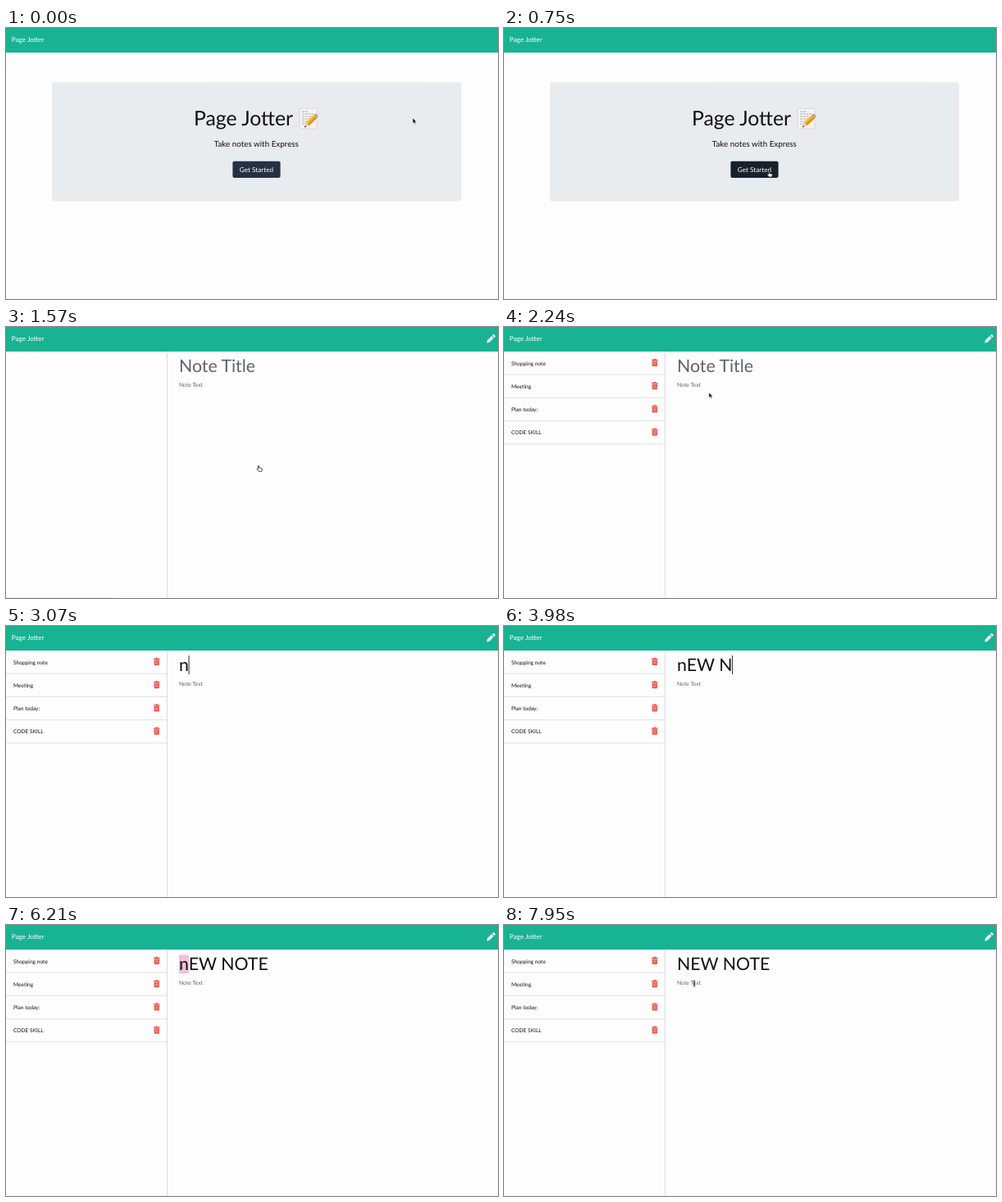
An HTML page for the animation above (8000 ms loop, 600 by 331 pixels).

```html
<!DOCTYPE html>
<html lang="en">
<head>
<meta charset="utf-8">
<title>Page Jotter</title>
<style>
  html, body { margin: 0; width: 100%; height: 100%; overflow: hidden; background: #fefdfe; }
  svg { display: block; width: 100%; height: 100%; }
  text { font-family: Lato, "Open Sans", sans-serif; fill: #111; white-space: pre; text-rendering: geometricPrecision; }
  .small { font-size: 6.6px; }
  .brand { font-size: 8.2px; fill: #fff; }
  .mid { text-anchor: middle; }
  .heading { font-size: 21.3px; }
  .hint { fill: #606365; }
</style>
</head>
<body>
<svg viewBox="0 0 600 331" preserveAspectRatio="none">
  <defs>
    <g id="bin" fill="#e35345">
      <path d="M0 1.2h2.2l.6-1h2l.6 1h2.2v1.1H0z"/>
      <path d="M.6 2.8h6.4v5.5q0 1-1 1H1.6q-1 0-1-1z"/>
      <path d="M2.3 3.9v4.2M3.8 3.9v4.2M5.3 3.9v4.2" stroke="#f6bcb5" stroke-width=".6"/>
    </g>
  </defs>
  <rect width="600" height="331" fill="#fefdfe"/>

  <g id="home">
    <rect x="56" y="66.3" width="499" height="145.2" rx="2" fill="#e8ecee"/>
    <text x="229" y="119.2" font-size="24.8">Page Jotter</text>
    <g id="memo">
      <rect x="358.2" y="98.3" width="20.8" height="24.6" rx="1" fill="#f4f4f3" stroke="#cfd1d2" stroke-width=".7"/>
      <path d="M361 102h8M361 105h14M361 108h12M361 111h10M361 114h7M361 117h4" stroke="#a3a6aa" stroke-width=".9" stroke-dasharray="3 .7"/>
      <path d="M364 121.5l1.8-6.3 4 3.8z" fill="#e9c79b"/>
      <path d="M364 121.5l.7-2.3 1.5 1.5z" fill="#333"/>
      <path d="M365.8 115.2l9-8.6 4 4-9 8.4z" fill="#f5bd2c"/>
      <path d="M367.8 117.1l9-8.5 2 2-9 8.4z" fill="#dc9420"/>
      <path d="M374.8 106.6l1.2-1.2 4 4-1.2 1.2z" fill="#a9adb0"/>
      <path d="M376 105.4q1.6-1.5 3.3.2 1.9 2 .7 3.8z" fill="#e58a86"/>
    </g>
    <text class="mid" x="305.3" y="145.4" font-size="9.85">Take notes with Express</text>
    <rect id="ring" x="275.3" y="161.6" width="60.4" height="22.4" rx="2.6" fill="#99a3ac"/>
    <rect id="button" x="276.4" y="162.7" width="58.2" height="20.2" rx="1.8"/>
    <text class="brand mid" x="305.5" y="175.8">Get Started</text>
  </g>

  <g id="notes">
    <path d="M196.5 30V331" stroke="#dcdcdf"/>
    <g id="list"></g>
    <rect id="selection" x="211" y="36.5" width="12" height="22.5" fill="#f5c0da"/>
    <text id="heading" class="heading" x="211" y="55.2"></text>
    <text class="hint" x="211" y="72.9" font-size="6.8">Note Text</text>
    <rect id="caret" width=".9" fill="#111"/>
  </g>

  <rect width="600" height="30" fill="#18b393"/>
  <text class="brand" x="6.7" y="17.4">Page Jotter</text>
  <path id="pencil" d="M586.3 19.4l.6-3.2 5.2-5.2 2.6 2.6-5.2 5.2zM592.8 10.3l1-1q.8-.7 1.6 0l1.1 1.1q.7.8 0 1.5l-1 1z" fill="#f3fbf9"/>
  <rect id="status" y="330" width="130" height="1" fill="#ebebed"/>

  <g id="pointer" stroke-linejoin="round">
    <path id="arrow" d="M0 0v6.6l1.6-1.4 1.1 2.5 1.1-.5-1.1-2.4h2.1z" fill="#111" stroke="#fff" stroke-width=".5"/>
    <path id="hand" d="M-1.6-3.2q.7-.8 1.3 0v2.2l3 .6q.7.2.6.9l-.5 2.8h-3.6l-2-2.5q-.2-.9.6-.8l.6.4z" fill="#fff" stroke="#222" stroke-width=".8"/>
    <g id="beam" fill="none">
      <path d="M-1.6-3.6Q0-3.5 0-2.5V2.5Q0 3.5-1.6 3.6M1.6-3.6Q0-3.5 0-2.5V2.5Q0 3.5 1.6 3.6M-.8.9H.8" stroke="#333" stroke-width=".8"/>
    </g>
  </g>
</svg>
<script>
const LOOP = 8000, LEFT = 211;
const $ = id => document.getElementById(id);
const heading = $('heading'), caret = $('caret');

$('list').innerHTML = ['Shopping note', 'Meeting', 'Plan today:', 'CODE SKILL'].map((label, i) =>
  `<g transform="translate(0 ${28.25 * i})"><text class="small" x="9" y="46.5">${label}</text>
   <use href="#bin" x="180" y="38.6"/><path d="M0 58.2H196" stroke="#dedee1" stroke-width=".9"/></g>`).join('');

// Each table lists [start time, value]; a value holds until the next row.
const titles = [[0, ''], [3070, 'n'], [3400, 'nE'], [3570, 'nEW'], [3810, 'nEW '], [3980, 'nEW N'],
  [4140, 'nEW NO'], [4310, 'nEW NOT'], [4390, 'nEW NOTE'], [6550, 'NEW NOTE']];
const carets = [[0, ''], [2820, 'end'], [4720, ''], [4970, 'end'], [5470, ''],
  [6550, 'first'], [6880, 'body'], [7330, ''], [7540, 'body'], [7950, '']];
const pointers = [[0, 'arrow'], [740, 'hand'], [1740, 'arrow'], [2320, 'beam'], [2980, ''],
  [5140, 'beam'], [6550, ''], [6720, 'beam']];
const path = [[0, 496, 110], [80, 495, 111], [330, 440, 160], [580, 365, 187], [740, 325, 179], [910, 309, 173],
  [1740, 309, 173], [1990, 288, 140], [2240, 250, 80], [2490, 230, 56], [2570, 230, 55],
  [5140, 230, 55], [5470, 238, 72], [5630, 240, 71], [5880, 225, 52], [5970, 223, 49], [6130, 214, 48.5],
  [6720, 214, 52], [6840, 228, 90], [7040, 231, 71], [7290, 231, 71], [7370, 232, 71.5]];

const at = (table, t) => table.findLast(row => row[0] <= t);
const show = (id, on) => $(id).setAttribute('visibility', on ? 'inherit' : 'hidden');
const place = (el, attrs) => { for (const k in attrs) el.setAttribute(k, attrs[k]); };

function position(t) {
  const next = path.findIndex(p => p[0] > t);
  if (next < 0) return path.at(-1).slice(1);
  const [a, b] = [path[next - 1], path[next]];
  const k = (t - a[0]) / (b[0] - a[0]);
  return [a[1] + (b[1] - a[1]) * k, a[2] + (b[2] - a[2]) * k];
}

function drawCaret(mode, title) {
  show('caret', mode);
  if (mode === 'body') return place(caret, { x: LEFT - .3, y: 66, height: 9 });
  const count = mode === 'first' ? 1 : title.length;
  const x = LEFT + (title ? heading.getSubStringLength(0, count) : 0);
  place(caret, { x: x - .3, y: 36, height: 23 });
}

function draw(t) {
  const home = t < 1570, title = at(titles, t)[1];
  $('home').style.display = home ? '' : 'none';
  $('notes').style.display = home ? 'none' : '';
  show('pencil', !home);
  show('list', t >= 1660);
  show('status', t >= 910 && t < 1660);
  show('ring', t >= 1400);
  $('button').setAttribute('fill', t >= 740 ? '#17202d' : '#253142');

  if (!home) {
    heading.textContent = title || 'Note Title';
    heading.classList.toggle('hint', !title);
    show('selection', t >= 6050 && t < 6550);
    drawCaret(at(carets, t)[1], title);
  }

  const shape = at(pointers, t)[1];
  for (const id of ['arrow', 'hand', 'beam']) show(id, id === shape);
  $('pointer').setAttribute('transform', `translate(${position(t)})`);
}

const start = performance.now();
function frame() {
  draw((performance.now() - start) % LOOP);
  requestAnimationFrame(frame);
}
frame();
</script>
</body>
</html>
```
